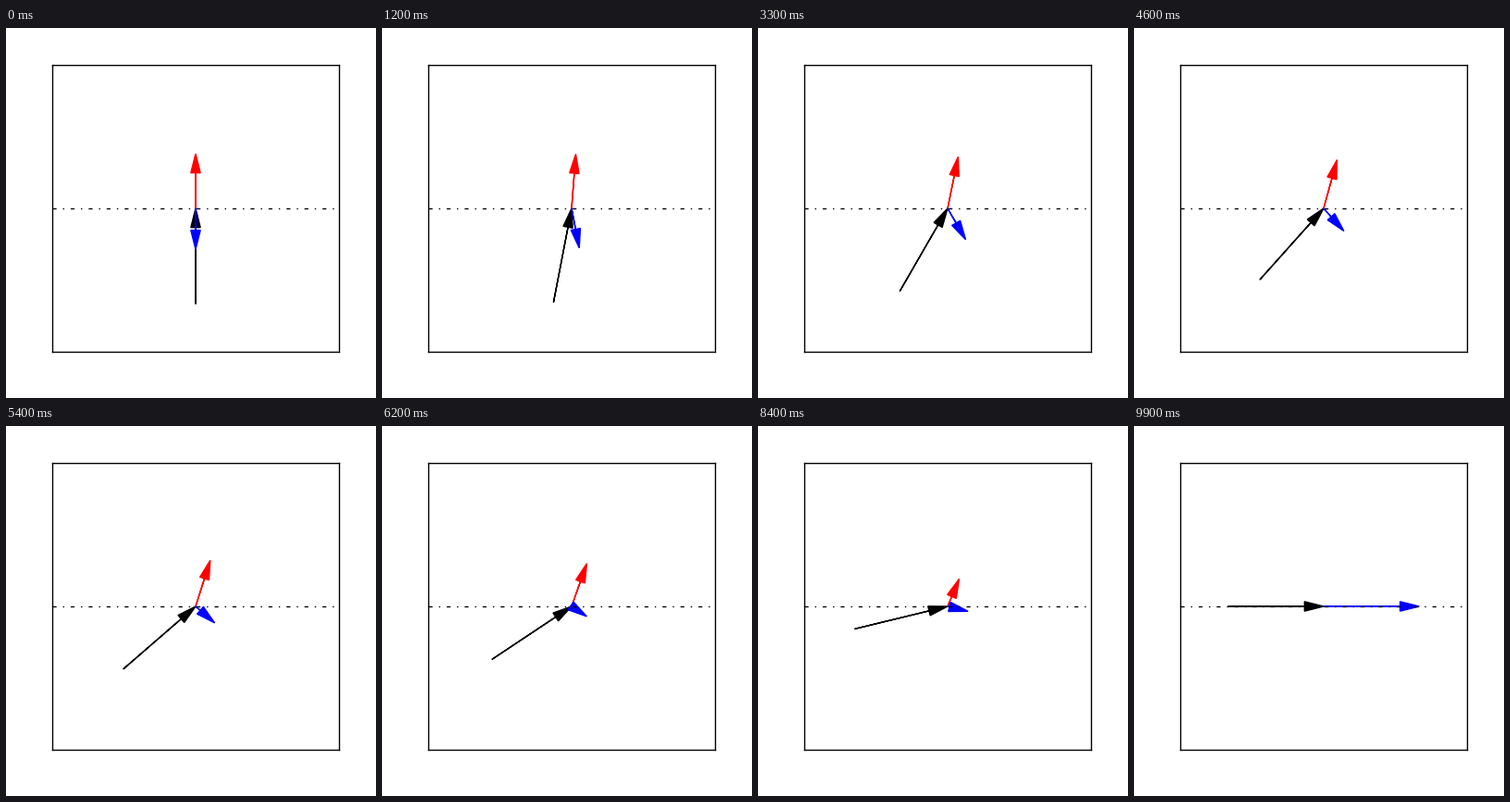
A matplotlib script for the animation above (10 s loop, 400 by 400 pixels).

```python
import numpy as np
import matplotlib.pyplot as plt
from matplotlib.animation import FuncAnimation
from matplotlib.patches import FancyArrow

FRAMES = 100
INDEX = 2.5  # ratio of refractive indices
angles = np.linspace(0, np.pi / 2, FRAMES)

fig = plt.figure(figsize=(4, 4), dpi=100, facecolor="white")
ax = fig.add_axes([0.125, 0.125, 0.775, 0.775])
ax.set(xlim=(-1.5, 1.5), ylim=(-1.5, 1.5), xticks=[], yticks=[])
for spine in ax.spines.values():
    spine.set_linewidth(1)
ax.plot([-1.5, 1.5], [0, 0], color="black", lw=1, ls=(0, (3, 5, 1, 5)))

arrows = []


def fresnel(theta):
    """Refraction angle and p-polarised reflection/transmission amplitudes."""
    phi = np.arcsin(np.sin(theta) / INDEX)
    ci, ct = np.cos(theta), np.cos(phi)
    total = INDEX * ci + ct
    return phi, (INDEX * ci - ct) / total, 2 * ci / total


def add_arrow(x, y, dx, dy, color):
    if np.hypot(dx, dy) < 1e-9:
        return
    arrow = FancyArrow(x, y, dx, dy, width=0.001, head_width=0.1,
                       head_length=0.2, length_includes_head=True,
                       fc=color, ec=color, lw=1)
    arrows.append(ax.add_patch(arrow))


def clear():
    while arrows:
        arrows.pop().remove()
    return []


def draw(i):
    clear()
    theta = angles[i]
    phi, r, t = fresnel(theta)
    s, c = np.sin(theta), np.cos(theta)
    add_arrow(-s, -c, s, c, "black")
    add_arrow(0, 0, t * np.sin(phi), t * np.cos(phi), "red")
    add_arrow(0, 0, abs(r) * s, -abs(r) * c, "blue")
    return arrows


anim = FuncAnimation(fig, draw, frames=FRAMES, init_func=clear,
                     interval=100, repeat=True, repeat_delay=0, blit=False)
plt.show()
```
